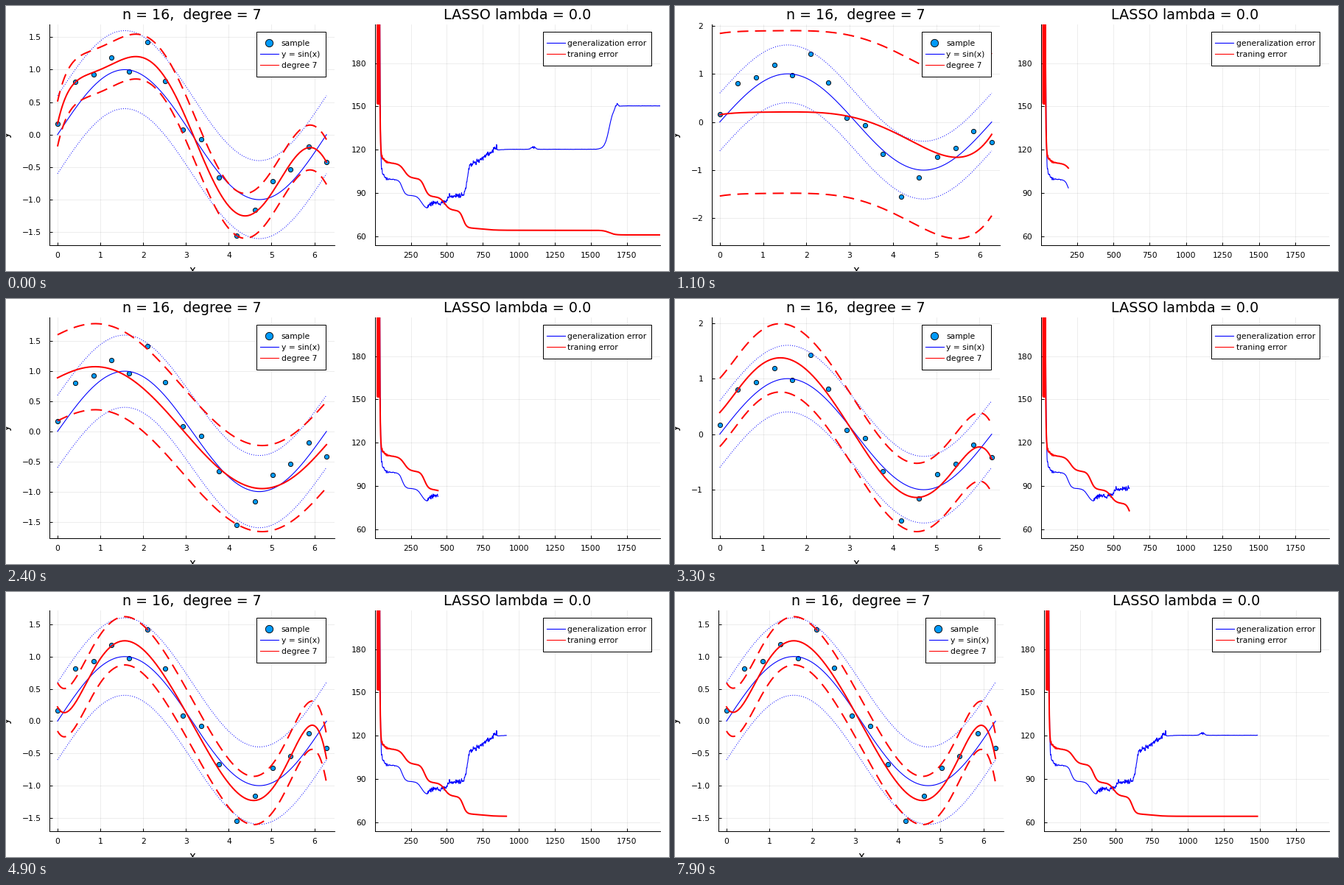
Recreate the animation shown at these times as a matplotlib script. Size 900 px wide and 360 px high, loop 8 s.

```python
import numpy as np
import matplotlib.pyplot as plt
from matplotlib.animation import FuncAnimation
from matplotlib.patches import Rectangle
from matplotlib.transforms import Affine2D

W, H, FRAMES, STEP = 900, 360, 80, 19
TOP, BOTTOM = 25, 324.5
PT = 0.72  # points per pixel at 100 dpi
BLUE, RED, FILL = "#0000ff", "#ff0000", "#009afa"
plt.rcParams["font.family"] = "DejaVu Sans"
rng = np.random.default_rng(4)

T = np.linspace(0, 2 * np.pi, 240)
XS = np.linspace(0, 2 * np.pi, 16)
YS = np.array([.165, .81, .93, 1.185, .97, 1.42, .82, .08,
               -.07, -.665, -1.55, -1.16, -.72, -.54, -.185, -.42])


def curve_through(points, turns):
    """Lowest polynomial through all points, level at the turning points."""
    p = np.arange(len(points) + 2 * len(turns))
    rows = [float(x) ** p for x, _ in points + turns]
    rows += [p * float(x) ** np.maximum(p - 1, 0) for x, _ in turns]
    goal = [y for _, y in points + turns] + [0] * len(turns)
    return np.polyval(np.linalg.solve(rows, goal)[::-1], T)


END = 2 * np.pi
# iteration, half width of the band, curve
POSES = [
    (1, 2.1, 0 * T),
    (77, 2.015, curve_through([(0, .01), (2, -.015), (3.35, -.1),
                               (4.6, -.305)], [(6.05, -.505)])),
    (305, 1.145, curve_through([(0, .385), (END, .14)],
                               [(1.8, .575), (5.38, -1.2)])),
    (438, .715, curve_through([(0, .89), (END, -.22)],
                              [(.88, 1.075), (4.78, -.95)])),
    (609, .615, curve_through([(0, .39), (3.14, -.035)],
                              [(1.4, 1.375), (4.55, -1.14), (6, -.23)])),
    (913, .374, curve_through([(0, .22), (3.14, -.03)],
                              [(1.57, 1.245), (4.58, -1.23), (5.95, -.063)])),
    (1981, .345, np.polyval(np.polyfit(XS, YS, 7), T)),
]

# error histories: a steep start, then soft steps (centre, width, change)
N = np.arange(1, 1982)


def history(level, steps):
    return level + sum(d / (1 + np.exp((c - N) / w)) for c, w, d in steps)


def decay(start, size, width):
    return size * np.exp((start - N) / width)


def bump(centre, width, size):
    return size * np.exp(-((N - centre) / width) ** 2)


base = history(110.5, [(205, 18, -10.3), (345, 14, -12.7), (485, 18, -9.5),
                       (613, 12, -12), (740, 45, -1.8), (1628, 20, -3.2)])
base += decay(30, 250, 3) + decay(41, 6, 25)
bumps = bump(835, 12, 2) + bump(1100, 18, 1.8) + bump(1680, 12, 2.3)
general = history(99.3, [(190, 11, -11), (325, 16, -9.8), (371, 4, 4.8),
                         (503, 8, 4.7), (640, 8, 22), (760, 32, 10.3),
                         (1628, 16, 30.1)])
general += decay(32.5, 250, 3) + decay(43, 8, 17) + bumps

noise = np.convolve(rng.normal(size=N.size), [.3, .55, .55, .3], "same")
rough = .8 * ((N > 365) & (N < 850)) + decay(40, 1.6, 30) + .2 * bumps + .05
general += noise * rough * (N > 40)
train = base + noise * decay(42, 1.2, 25) * (N > 42)
train[N < 31] = 400
train[(N >= 18) & (N < 31) & (N % 2 == 0)] = 152
progress = np.minimum(base, 115)


def fit_at(n):
    """Curve and half band; between poses they follow the drop in error."""
    i = max(sum(p[0] < n for p in POSES) - 1, 0)
    (n0, band0, y0), (n1, band1, y1) = POSES[i:i + 2]
    e0, e, e1 = progress[[n0 - 1, n - 1, n1 - 1]]
    t = (e0 - e) / (e0 - e1)
    return y0 + (y1 - y0) * t, band0 + (band1 - band0) * t


# stage
fig = plt.figure(figsize=(W / 100, H / 100), dpi=100, facecolor="white")


def panel():
    ax = fig.add_axes([0, 0, 1, 1])
    ax.spines[["top", "right"]].set_visible(False)
    ax.spines[["left", "bottom"]].set_linewidth(PT)
    ax.set_axisbelow(True)
    ax.grid(color="black", alpha=.1, lw=.5)
    ax.tick_params(direction="in", length=4 * PT, width=PT,
                   labelsize=10.8 * PT)
    ax.tick_params(axis="x", pad=9.5 * PT)
    ax.tick_params(axis="y", pad=11.5 * PT)
    return ax


def place(ax, left, right):
    ax.set_position([left / W, 1 - BOTTOM / H,
                     (right - left) / W, (BOTTOM - TOP) / H])


fit_ax, err_ax = panel(), panel()
fit_ax.set_xlim(-.03 * END, 1.03 * END)
fit_ax.set_xticks(range(7))
err_ax.set(xlim=(1.5, 1981.5), ylim=(54.1, 206.8))
err_ax.set_xticks(range(250, 1751, 250))
err_ax.set_yticks(range(60, 181, 30))

THIN, THICK = 1.1 * PT, 2 * PT
DOT = dict(marker="o", ls="none", mfc=FILL, mec="black", mew=.9 * PT)
fit_ax.plot(XS, YS, ms=6.2 * PT, zorder=3, **DOT)
fit_ax.plot(T, np.sin(T), color=BLUE, lw=THIN, zorder=4)
for off in (-.6, .6):
    fit_ax.plot(T, np.sin(T) + off, color=BLUE, lw=PT, ls=(0, (1, 2)),
                zorder=4)
mid, = fit_ax.plot([], [], color=RED, lw=THICK, zorder=5)
low, high = (fit_ax.plot([], [], color=RED, lw=THICK, ls=(0, (7.5, 4.5)),
                         zorder=5)[0] for _ in range(2))
gen_line, = err_ax.plot([], [], color=BLUE, lw=THIN, zorder=3)
train_line, = err_ax.plot([], [], color=RED, lw=THICK, zorder=4)

# titles and legends in pixel coordinates
over = fig.add_axes([0, 0, 1, 1], zorder=5)
over.axis("off")
shifts = [Affine2D() for _ in range(4)]
title_l, legend_l, title_r, legend_r = (s + over.transData for s in shifts)


def label(x, y, s, px, tr, **kw):
    over.text(x, y, s, fontsize=px * PT, transform=tr, va="baseline", **kw)


def legend(x, width, rows, tr):
    over.add_patch(Rectangle((x, 34.5), width, 15 * len(rows) + 16,
                             fc="white", ec="black", lw=PT, transform=tr))
    for i, (text, color) in enumerate(rows):
        y = 50 + 15 * i
        if color == FILL:
            over.plot([x + 17], [y], ms=10.3 * PT, transform=tr, **DOT)
        else:
            over.plot([x + 5, x + 30], [y, y], color=color, lw=THIN,
                      transform=tr)
        label(x + 34, y + 4, text, 10.8, tr)


label(252.5, 17.5, "n = 16,  degree = 7", 19, title_l, ha="center")
label(252.5, 364, "x", 14.9, title_l, ha="center")
label(5, 175, "y", 14.9, over.transData, ha="center", rotation=90,
      rotation_mode="anchor")
label(694, 17.5, "LASSO lambda = 0.0", 19.1, title_r, ha="center")
legend(339.5, 94, [("sample", FILL), ("y = sin(x)", BLUE),
                   ("degree 7", RED)], legend_l)
legend(728.5, 147, [("generalization error", BLUE),
                    ("traning error", RED)], legend_r)
over.set(xlim=(0, W), ylim=(H, 0))


def set_scale(lo, hi):
    """Autoscale the left panel; whole-number ticks narrow its margin."""
    pad = .03 * (hi - lo)
    lo, hi = lo - pad, hi + pad
    halves = np.arange(np.ceil(lo * 2), np.floor(hi * 2) + 1) / 2
    wide = len(halves) <= 7
    ticks = halves if wide else halves[halves % 1 == 0]
    fmt = "{:.1f}" if wide else "{:.0f}"
    names = [fmt.format(v + 0.0).replace("-", "\u2212") for v in ticks]
    fit_ax.set_yticks(ticks, names)
    fit_ax.set_ylim(lo, hi)
    place(fit_ax, *((59, 446) if wide else (49.7, 441)))
    place(err_ax, 501 if wide else 496.5, 888)
    for s, dx in zip(shifts, (-7, -5, -2, -.7)):
        s.clear().translate(0 if wide else dx, 0)


def draw(k):
    n = 1 + STEP * (k - 1) if k else N.size
    curve, band = fit_at(n)
    mid.set_data(T, curve)
    low.set_data(T, curve - band)
    high.set_data(T, curve + band)
    gen_line.set_data(N[:n], general[:n])
    train_line.set_data(N[:n], train[:n])
    set_scale(min(-1.6, (curve - band).min()), max(1.6, (curve + band).max()))
    return []


anim = FuncAnimation(fig, draw, frames=FRAMES, interval=100, repeat=True,
                     repeat_delay=0, blit=False)
plt.show()
```
